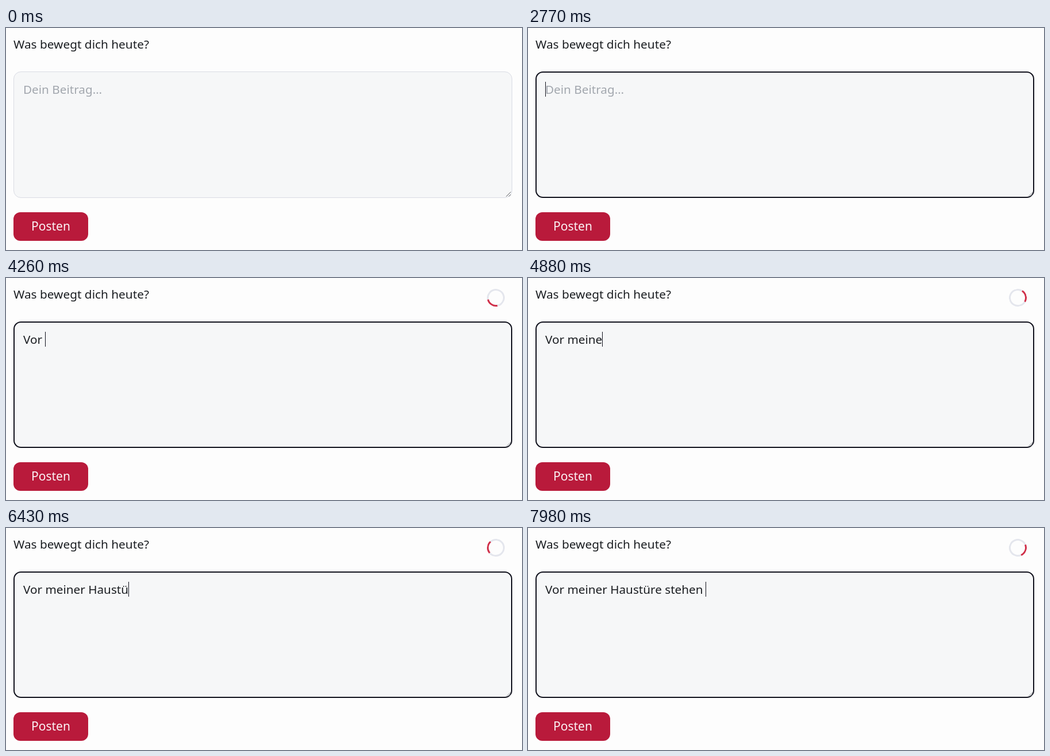
Recreate the animation shown at these times as an HTML page. Size 898 px wide and 388 px high, loop 8000 ms.

```html
<!DOCTYPE html>
<html lang="de">
<head>
<meta charset="utf-8">
<style>
  html, body { margin: 0; width: 100%; height: 100%; overflow: hidden; background: #fdfdfd; }
  body { position: relative; font: 20.7px/26px "Noto Sans", sans-serif; color: #1b1e22; }
  body * { position: absolute; box-sizing: border-box; white-space: pre; }
  #title { left: 13px; top: 15px; font-size: 20.8px; }
  #field { left: 13px; top: 76px; width: 868px; height: 221px; border-radius: 13px;
           border: 1px solid #d9dbe4; background: #f6f7f8; }
  #field.focus { border: 2px solid #10111c; }
  #grip { left: 869px; top: 285px; stroke: #55575c; }
  .focus + #grip { stroke: #a3a5aa; }
  #text { left: 30px; top: 94px; }
  #text.empty { color: #a2a7ae; }
  #caret { top: 94px; width: 1px; height: 26px; background: #10111c; }
  #button { left: 13px; top: 322px; width: 130px; height: 50px; border-radius: 12px;
            background: #b91a3b; color: #fbf3f5; font-size: 21px; line-height: 49px; text-align: center; }
  #spinner { left: 837px; top: 19px; width: 31px; height: 31px; border-radius: 50%;
             border: 3px solid #e4e6ed; border-top-color: #d0304a; }
</style>
</head>
<body>
<div id="title">Was bewegt dich heute?</div>
<div id="field"></div>
<svg id="grip" width="12" height="12"><path d="M1.5 9.5L9.5 1.5M6 9.5L9.5 6"/></svg>
<span id="text"></span>
<div id="caret"></div>
<div id="button">Posten</div>
<div id="spinner"></div>
<script>
const LOOP = 8000, FOCUS = 1590, START = 3740;
const KEYS = "Vor meiner HA<austüre stehen "; // "<" is backspace
const TIMES = [3740, 3860, 4000, 4120, 4320, 4440, 4560, 4700, 4820, 4940, 5060, 5210, 5490, 5720, 5900,
  6080, 6290, 6350, 6420, 6560, 6700, 6840, 6990, 7110, 7210, 7310, 7450, 7600, 7760];
const [field, text, caret, spinner] = ["field", "text", "caret", "spinner"].map(id => document.getElementById(id));

function typed(t) {
  let out = "";
  TIMES.forEach((time, i) => {
    if (t >= time) out = KEYS[i] === "<" ? out.slice(0, -1) : out + KEYS[i];
  });
  return out;
}

function caretVisible(t) {
  return t >= START || (t >= FOCUS && t < 2170) || (t >= 2770 && t < 3380);
}

function show(t) {
  const value = typed(t);
  const label = value || "Dein Beitrag…";
  field.className = t >= FOCUS ? "focus" : "";
  text.className = value ? "" : "empty";
  if (text.textContent !== label) text.textContent = label;
  caret.hidden = !caretVisible(t);
  caret.style.left = 30 + (value ? Math.floor(text.getBoundingClientRect().width) : 0) + "px";
  spinner.hidden = t < START;
  // The spinner stalls briefly while the page is busy.
  const spin = t > 5250 && t < 5480 ? 5250 : t;
  spinner.style.transform = `rotate(${spin * 0.36 + 119}deg)`;
}

const begin = performance.now();
function tick() {
  show((performance.now() - begin) % LOOP);
  requestAnimationFrame(tick);
}
tick();
</script>
</body>
</html>
```
